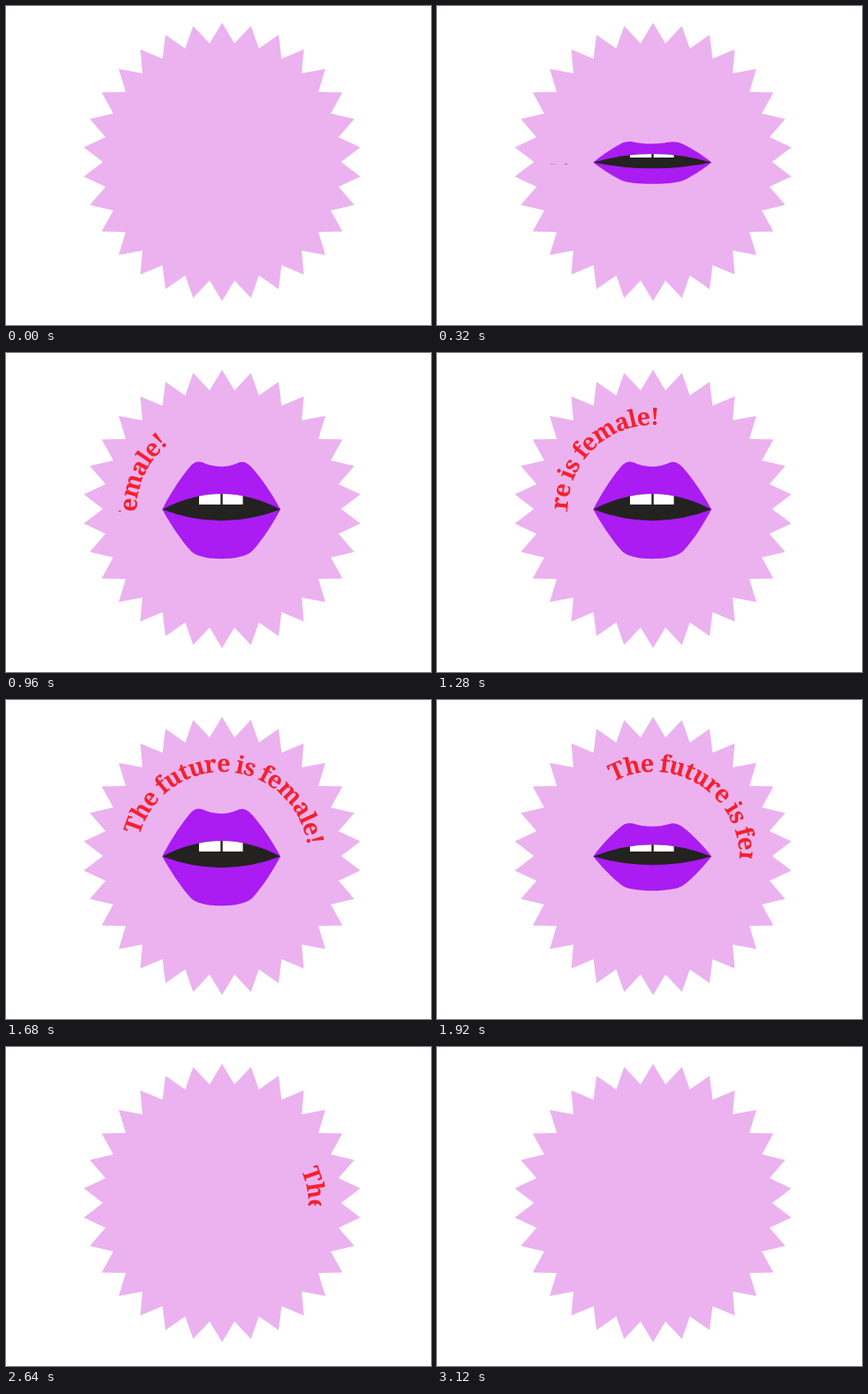
An HTML page with a canvas for the animation above (3.2 s loop, 480 by 360 pixels).

```html
<!DOCTYPE html>
<html lang="en">
<head>
<meta charset="utf-8">
<title>The future is female!</title>
<style>
html, body { margin: 0; width: 100%; height: 100%; overflow: hidden; background: #fff; }
canvas { display: block; width: 480px; height: 360px; }
</style>
</head>
<body>
<canvas id="stage" width="480" height="360"></canvas>
<script>
const ctx = document.getElementById('stage').getContext('2d');
const LOOP = 3200;
const RAD = Math.PI / 180;
const COLOR = { badge: '#ebb2ef', lips: '#aa1cf2', dark: '#232220', text: '#f6202c' };
const FONT = '900 27px "Noto Serif", serif';
const TEXT = 'The future is female!';
const TEXT_R = 97;
const TEXT_X = 244.5, TEXT_Y = 178;
const CLIP_Y = 179;
const SPAN = 119; // degrees between the "f" of "future" and "!"

// [ms, angle of the "f" of "future" from the top]
const TURN = [[0, -222], [640, -193], [1280, -118.3], [1680, -40.3],
  [1920, 6.7], [2240, 57.8], [2720, 108], [3200, 136]];

function smooth(a, b, t) {
  const p = Math.min(1, Math.max(0, (t - a) / (b - a)));
  return p * p * (3 - 2 * p);
}

function slope(keys, i) {
  const a = keys[Math.max(0, i - 1)], b = keys[Math.min(keys.length - 1, i + 1)];
  return (b[1] - a[1]) / (b[0] - a[0]);
}

// Cubic Hermite curve through the keys
function curve(keys, t) {
  let i = 0;
  while (i < keys.length - 2 && t >= keys[i + 1][0]) i++;
  const [t0, v0] = keys[i], [t1, v1] = keys[i + 1];
  const d = t1 - t0, p = (t - t0) / d, q = 1 - p;
  return v0 * q * q * (1 + 2 * p) + v1 * p * p * (1 + 2 * q)
    + d * p * q * (slope(keys, i) * q - slope(keys, i + 1) * p);
}

// Angle of every letter relative to the "f" of "future"
function layout() {
  ctx.font = FONT;
  let x = 0;
  const mids = [...TEXT].map(c => {
    const w = ctx.measureText(c).width;
    x += w;
    return x - w / 2;
  });
  const first = TEXT.indexOf('f'), last = TEXT.length - 1;
  const track = (SPAN * RAD * TEXT_R - (mids[last] - mids[first])) / (last - first);
  return mids.map((m, i) => (m - mids[first] + (i - first) * track) / TEXT_R);
}

const angles = layout();

function badge() {
  ctx.beginPath();
  for (let i = 0; i < 60; i++) {
    const r = i % 2 ? 134.5 : 157, a = i * 6 * RAD;
    ctx.lineTo(244 + r * Math.sin(a), 176 - r * Math.cos(a));
  }
  ctx.fillStyle = COLOR.badge;
  ctx.fill();
}

function mouth(k) {
  if (k < 0.01) return;
  const y = v => 176.5 + v * k;
  ctx.beginPath();
  ctx.moveTo(176.5, y(0));
  ctx.bezierCurveTo(184, y(-15), 196, y(-34), 206, y(-46));
  ctx.bezierCurveTo(211, y(-53), 216, y(-55), 222, y(-53));
  ctx.bezierCurveTo(234, y(-47), 250, y(-47), 261, y(-52));
  ctx.bezierCurveTo(267, y(-55), 272, y(-53), 277, y(-48));
  ctx.bezierCurveTo(289, y(-35), 302, y(-15), 310, y(0));
  ctx.bezierCurveTo(302, y(15), 290, y(34), 279, y(46));
  ctx.bezierCurveTo(269, y(59), 217, y(59), 208, y(46));
  ctx.bezierCurveTo(198, y(35), 184, y(14), 176.5, y(0));
  ctx.fillStyle = COLOR.lips;
  ctx.fill();

  const open = k ** 0.75;
  ctx.save();
  ctx.beginPath();
  ctx.moveTo(176.5, 176.5);
  ctx.quadraticCurveTo(243.5, 176.5 - 35 * open, 310, 176.5);
  ctx.quadraticCurveTo(243.5, 176.5 + 25.5 * open, 176.5, 176.5);
  ctx.fillStyle = COLOR.dark;
  ctx.fill();
  ctx.clip();
  ctx.fillStyle = '#fff';
  ctx.fillRect(218, 150, 24.3, 21);
  ctx.fillRect(244.7, 150, 22.8, 21);
  ctx.restore();
}

function slogan(turn) {
  ctx.save();
  ctx.beginPath();
  ctx.rect(0, 0, 480, CLIP_Y);
  ctx.clip();
  ctx.translate(TEXT_X, TEXT_Y);
  ctx.font = FONT;
  ctx.textAlign = 'center';
  ctx.fillStyle = COLOR.text;
  angles.forEach((a, i) => {
    const at = turn * RAD + a;
    if (Math.abs(at) > 2) return;
    ctx.save();
    ctx.rotate(at);
    ctx.fillText(TEXT[i], 0, -TEXT_R);
    ctx.restore();
  });
  ctx.restore();
}

function draw(t) {
  ctx.fillStyle = '#fff';
  ctx.fillRect(0, 0, 480, 360);
  badge();
  mouth(smooth(120, 560, t) - smooth(1760, 2200, t));
  slogan(curve(TURN, t));
}

const start = performance.now();
function frame(now) {
  draw(Math.max(0, now - start) % LOOP);
  requestAnimationFrame(frame);
}
draw(0);
requestAnimationFrame(frame);
</script>
</body>
</html>
```
